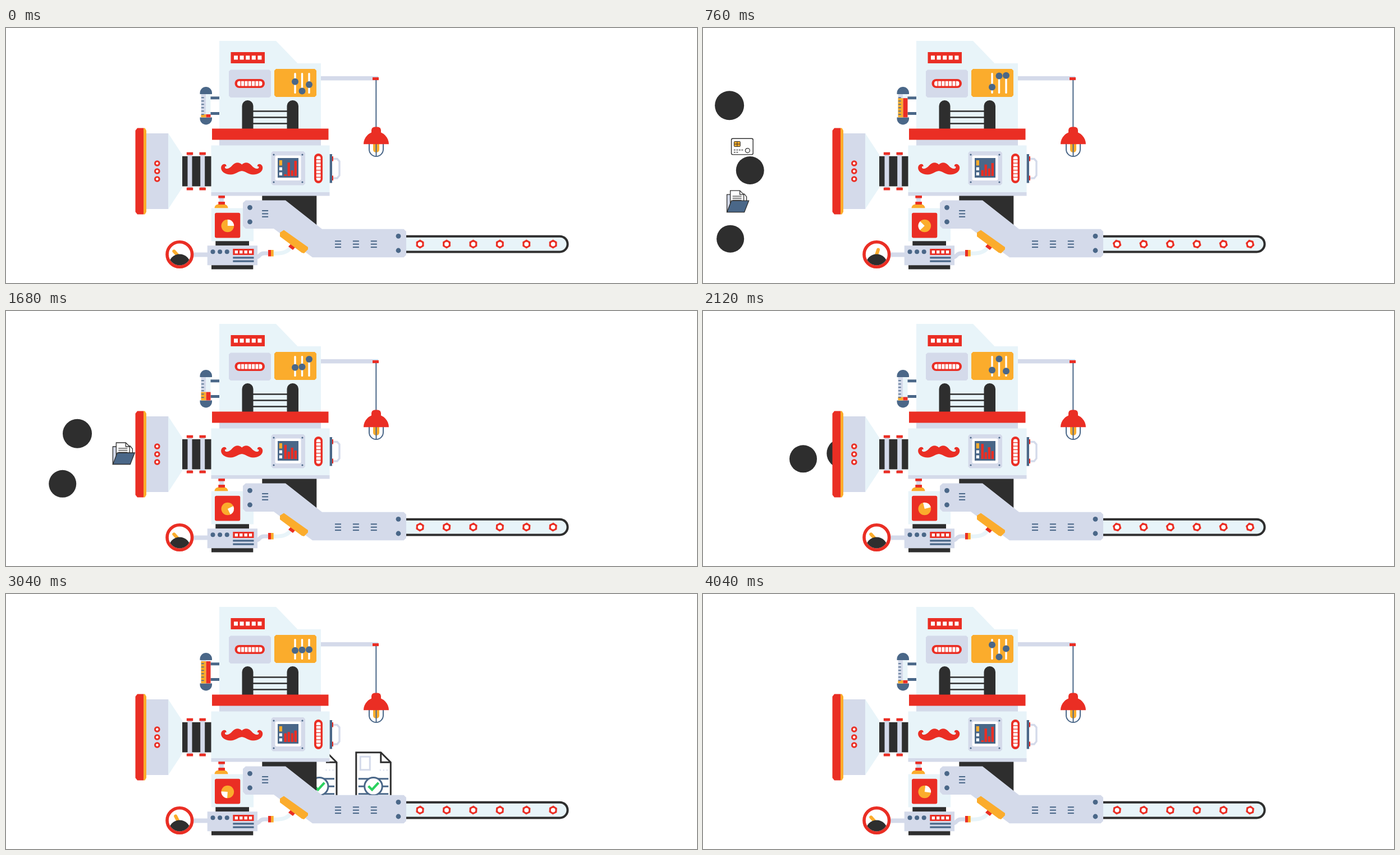
An HTML page with a canvas that plays this animation: 1231x455 px, repeating every 4080 ms.

```html
<!DOCTYPE html>
<html lang="en">
<head>
<meta charset="utf-8">
<title>Document machine</title>
<style>
html, body { margin: 0; width: 100%; height: 100%; overflow: hidden; background: #fff; }
canvas { display: block; width: 1231px; height: 455px; }
</style>
</head>
<body>
<canvas id="stage" width="1231" height="455"></canvas>
<script>
const g = document.getElementById('stage').getContext('2d');
const LOOP = 4080, STEP = 40, TAU = Math.PI * 2, DEG = Math.PI / 180;
const ICE = '#e8f4f9', LAV = '#d4daea', RED = '#ea2e24', YEL = '#fbac2c',
      DARK = '#2e2e2e', BLUE = '#4a6788', WHITE = '#fff', GREEN = '#2bd15f';

// --- helpers ---
const clamp = v => Math.max(0, Math.min(1, v));
const wave = (t, cycles, shift = 0) => Math.sin(TAU * cycles * t / LOOP + shift * DEG);
const hump = (t, start, end) => Math.sin(Math.PI * clamp((t - start) / (end - start)));

function box(c, x, y, x2, y2, r = 0) {
  g.fillStyle = c;
  g.beginPath();
  g.roundRect(x, y, x2 - x, y2 - y, r);
  g.fill();
}
function trace(pts, close) {
  g.beginPath();
  pts.forEach(([x, y]) => g.lineTo(x, y));
  if (close) g.closePath();
}
function poly(c, ...pts) {
  g.fillStyle = c;
  trace(pts, true);
  g.fill();
}
function line(c, w, ...pts) {
  g.strokeStyle = c;
  g.lineWidth = w;
  trace(pts);
  g.stroke();
}
function disc(c, x, y, r) {
  g.fillStyle = c;
  g.beginPath();
  g.arc(x, y, r, 0, TAU);
  g.fill();
}
function ring(c, w, x, y, r) {
  disc(WHITE, x, y, r);
  g.strokeStyle = c;
  g.lineWidth = w;
  g.stroke();
}
function chamfer(c, x, y, x2, y2, k) {
  poly(c, [x + k, y], [x2 - k, y], [x2, y + k], [x2, y2 - k],
    [x2 - k, y2], [x + k, y2], [x, y2 - k], [x, y + k]);
}

// --- icons drawn into the funnel ---
const badge = r => () => disc(DARK, 0, 0, r);
const icons = [
  { draw: badge(26), x: 43, y: 110, arrive: 2130 },
  { draw: card, x: 56, y: 189, arrive: 1522 },
  { draw: badge(25), x: 62, y: 254, arrive: 1340 },
  { draw: folder, x: 54, y: 329, arrive: 1786 },
  { draw: badge(24.5), x: 46, y: 400, arrive: 2375 }
];

function card() {
  box(DARK, -20, -15, 20, 15, 3);
  box(WHITE, -18.6, -13.6, 18.6, 13.6, 2);
  box(DARK, -15, -9.5, -3, 0.5, 2);
  box(YEL, -14, -8.5, -4, -0.5, 1);
  line(DARK, 1, [-14, -4.5], [-4, -4.5]);
  line(DARK, 1, [-9, -8.5], [-9, -0.5]);
  g.setLineDash([3, 1.5]);
  line(DARK, 1.3, [-15, 6], [2, 6]);
  line(DARK, 1.3, [-15, 10], [-6, 10]);
  g.setLineDash([]);
  ring(DARK, 1.2, 9.5, 7, 4);
}
function folder() {
  const edge = (c, ...pts) => {
    poly(c, ...pts);
    g.strokeStyle = DARK;
    g.lineWidth = 1.3;
    g.stroke();
  };
  edge(LAV, [-19, 19], [-19, -12], [-9, -12], [-6, -7], [12, -7], [12, 4]);
  edge(WHITE, [-8, 4], [-8, -13], [12, -13], [16, -8], [16, 4]);
  edge(WHITE, [-13, 4], [-13, -19], [4, -19], [11, -12], [11, 4]);
  line(DARK, 1.3, [4, -19], [4, -12], [11, -12]);
  for (const y of [-9, -5.5, -2]) line(DARK, 1.2, [-9, y], [7, y]);
  edge(BLUE, [-11, -1], [20, -1], [12, 19.5], [-19, 19.5]);
}
function drawIcons(t) {
  if (t < STEP) return;
  icons.forEach(({ draw, x, y, arrive }, i) => {
    const u = t / arrive;
    const px = x + (250 - x) * u ** 3.8;
    if (px > 270) return;
    const py = y + (254 - y) * clamp(u / 0.93) ** 1.7;
    const grow = 1 - (1 - clamp((t - i * 40) / 280)) ** 2;
    g.save();
    g.translate(px, py);
    g.scale(grow, grow);
    draw();
    g.restore();
  });
}

// --- finished sheets ---
function sheet(x, y) {
  g.save();
  g.translate(x, y);
  trace([[0.5, 0.5], [44.5, 0.5], [62, 18], [62, 86], [0.5, 86]], true);
  g.fillStyle = WHITE;
  g.fill();
  g.strokeStyle = DARK;
  g.lineWidth = 3;
  g.stroke();
  line(DARK, 3, [44.5, 0.5], [44.5, 18], [62, 18]);
  g.strokeStyle = LAV;
  g.lineWidth = 3;
  g.strokeRect(8, 8, 17, 23.5);
  for (let i = 0; i < 3; i++) box(LAV, 42.5 + i * 6, 31, 44.5 + i * 6, 33);
  for (let i = 0; i < 3; i++) line(BLUE, 3, [4.5, 47.5 + i * 13.5], [58, 47.5 + i * 13.5]);
  ring(BLUE, 3, 31.2, 61, 15.8);
  line(GREEN, 4.2, [22.3, 60.5], [28.8, 67], [40.3, 54.5]);
  g.restore();
}
// Five sheets hop along the belt one place at a time, then fade.
function drawSheets(t) {
  const HOP = 175, GAP = 96.3, START = 2714;
  if (t < START || t > 3900) return;
  const p = Math.min(5, (t - START) / HOP), n = Math.floor(p), u = p - n;
  const head = 432.5 + GAP * (n + 1 - (1 - u) ** 2) - GAP * (n === 5 ? 0 : 0);
  g.save();
  g.globalAlpha = 1 - clamp((t - 3720) / 180);
  g.beginPath();
  g.rect(545, 0, 686, 372);
  g.clip();
  for (let i = 0; i < 5; i++) sheet(head - i * GAP, 287 - 40 * u * (1 - u));
  g.restore();
}

// --- machine ---
function knob(i, y) {
  const x = 515 + i * 12.5;
  box(WHITE, x - 1.7, 80, x + 1.7, 117, 1.5);
  disc(BLUE, x, y, 6);
}
function tower(t) {
  poly(ICE, [380, 23], [481, 23], [519.5, 63], [561, 63], [561, 181], [380, 181]);
  box(RED, 400.5, 43, 461, 63);
  for (let i = 0; i < 5; i++) box(WHITE, 406 + i * 10.6, 49.3, 413 + i * 10.6, 56.5);
  chamfer(LAV, 397, 74.5, 472, 124, 3);
  box(RED, 407.5, 91, 461, 107, 8);
  box(WHITE, 412, 94.8, 456.5, 103.4, 4);
  for (let i = 1; i < 7; i++) line(RED, 1.3, [412 + i * 6.35, 94], [412 + i * 6.35, 104]);

  chamfer(YEL, 478, 73, 553, 123, 3);
  knob(0, 97 + 14 * wave(t, 6, -5));
  knob(1, 98.5 + 14 * wave(t, 3, 90));
  knob(2, 98.5 + 14 * wave(t, 4, 10));

  for (const y of [148.5, 159.5, 170.5]) line(DARK, 2.4, [440, y], [501, y]);
  box(DARK, 420.5, 129, 440.5, 181, [10, 10, 0, 0]);
  box(DARK, 500.5, 129, 521, 181, [10, 10, 0, 0]);
  box(LAV, 380, 199, 561, 210);
  box(RED, 367, 179.5, 574.5, 199.5);
}

function lamp() {
  box(LAV, 553, 86, 663, 93.5);
  box(RED, 653, 88, 664, 93);
  line(BLUE, 2, [659.3, 93], [659.3, 178]);
  box(YEL, 654, 206, 665, 222, [0, 0, 5, 5]);
  line(BLUE, 2, [659.5, 207], [659.5, 229]);
  g.beginPath();
  g.moveTo(647, 207);
  g.lineTo(647, 216.5);
  g.arc(659.5, 216.5, 12.5, Math.PI, 0, true);
  g.lineTo(672, 207);
  g.stroke();
  box(RED, 651, 176.5, 668, 192, 6);
  g.beginPath();
  g.arc(659.5, 207.3, 22.5, Math.PI, 0);
  g.fill();
}

function thermometer(t) {
  box(BLUE, 364, 122.3, 381, 127.3);
  box(BLUE, 364, 150, 381, 155);
  box(BLUE, 345.5, 105, 367, 118, [11, 11, 0, 0]);
  box(BLUE, 345.5, 159.5, 367, 172.5, [0, 0, 11, 11]);
  box(LAV, 347.5, 118, 356.5, 159.5);
  box(ICE, 356.5, 118, 364.5, 159.5);
  const y = 137 + 17 * wave(t, 2, 90);
  box(YEL, 347.5, y, 356.5, 159.5);
  box(RED, 356.5, y, 364.5, 159.5);
  for (let i = 0; i < 6; i++) line(BLUE, 1.6, [348, 124.3 + i * 6], [352.8, 124.3 + i * 6]);
}

function funnel() {
  poly(RED, [234, 178.5], [245, 178.5], [245, 332.5], [234, 332.5], [230.5, 328], [230.5, 183]);
  poly(YEL, [245, 178.5], [247.5, 178.5], [250, 183], [250, 328], [247.5, 332.5], [245, 332.5]);
  box(LAV, 250, 188, 289.3, 323);
  poly(ICE, [289, 188], [314, 226], [314, 285], [289, 323]);
  for (const y of [241.5, 255.5, 269.5]) ring(RED, 3, 269.3, y, 3.8);
  box(DARK, 314, 228.7, 366, 282.5);
  for (const x of [323.5, 346.2]) {
    box(LAV, x, 226, x + 8, 285);
    box(RED, x - 1.7, 221.7, x + 9.7, 226.5);
    box(RED, x - 1.7, 284.7, x + 9.7, 289.5);
  }
}

function moustache() {
  g.fillStyle = RED;
  for (const side of [1, -1]) {
    g.save();
    g.translate(420.2, 0);
    g.scale(side, 1);
    g.beginPath();
    g.moveTo(0.3, 244);
    g.bezierCurveTo(-5, 238.5, -12, 239.5, -17, 245);
    g.bezierCurveTo(-22, 251, -28, 252.5, -30, 249.5);
    g.bezierCurveTo(-31, 247.5, -29, 246, -27.5, 247);
    g.bezierCurveTo(-27, 241.5, -35, 241, -37, 248);
    g.bezierCurveTo(-38, 256, -30, 261.5, -20, 261.5);
    g.bezierCurveTo(-11, 261.5, -7, 255.5, 0.3, 255);
    g.fill();
    g.restore();
  }
}

function screen(t) {
  chamfer(LAV, 472.5, 220, 533, 280.5, 3);
  for (const x of [477, 528]) for (const y of [226, 275]) disc(BLUE, x, y, 1.6);
  box(WHITE, 479.5, 227.5, 525.5, 272, 3);
  box(BLUE, 484, 232, 521, 267);
  box(YEL, 486.8, 236, 492, 245.3);
  box(WHITE, 486.8, 248.5, 492, 254);
  box(WHITE, 486.8, 257.5, 492, 263);
  const swell = hump(t, 0, LOOP) ** 2;
  const bar = (i, top, rise) => box(RED, 495.5 + i * 6, top - rise * swell, 500 + i * 6, 264);
  bar(0, 261, 24);
  bar(1, 240, -12);
  bar(2, 254, 11);
  bar(3, 237, -13);
}

function core(t) {
  box(ICE, 365.5, 209.5, 576.5, 293);
  box(LAV, 365.5, 293, 576.5, 299.5);
  moustache();
  screen(t);
  box(RED, 549, 224, 564, 277, 7.5);
  box(WHITE, 552.8, 228.5, 560.5, 272.5, 3.8);
  for (let i = 1; i < 7; i++) line(RED, 1.3, [552, 228.5 + i * 6.3], [561, 228.5 + i * 6.3]);
  line(LAV, 3.4, [582, 233.5], [590, 233.5], [594, 238], [594, 263], [590, 268], [582, 268]);
  box(RED, 580, 229, 583, 237.5);
  box(RED, 580, 263.5, 583, 272);
  box(BLUE, 576.7, 225, 581, 276.5);
}

function nut(x, turn) {
  const pts = [];
  for (let i = 0; i < 6; i++) {
    const a = turn + i * TAU / 6;
    pts.push([x + 8 * Math.sin(a), 385.6 - 8 * Math.cos(a)]);
  }
  poly(RED, ...pts);
  disc(WHITE, x, 385.6, 3.9);
}
function belt(t) {
  box(DARK, 690, 369.7, 1002.5, 401.5, 15.9);
  box(ICE, 690, 373.7, 998.5, 397.5, 11.9);
  for (let i = 0; i < 6; i++) nut(737.6 + i * 47.4, -2 * TAU * t / LOOP);
}

function vents(x, y) {
  for (let i = 0; i < 3; i++) line(BLUE, 2.1, [x - 5.5, y + i * 5.4], [x + 5.5, y + i * 5.4]);
}
function arm() {
  poly(LAV, [427, 307.5], [498, 307.5], [563, 358.7], [708.5, 358.7], [713, 363], [713, 405],
    [708.5, 409.3], [546, 409.3], [477, 358], [427, 358], [422, 353], [422, 312]);
  for (const [x, y] of [[434.5, 320.3], [434.5, 345.8], [699, 371.3], [699, 397]]) disc(BLUE, x, y, 4.4);
  vents(461.6, 326);
  for (let i = 0; i < 3; i++) vents(591.5 + i * 31.9, 380.3);
}

function hose() {
  g.lineWidth = 7;
  g.strokeStyle = ICE;
  g.beginPath();
  g.moveTo(476, 402);
  g.bezierCurveTo(494, 403, 503, 399, 508, 390);
  g.stroke();
  g.strokeStyle = LAV;
  g.beginPath();
  g.moveTo(446, 409);
  g.bezierCurveTo(453, 409, 450, 402, 460, 402);
  g.lineTo(468, 402);
  g.stroke();
  box(RED, 467, 396, 472, 407.5);
  box(YEL, 472, 396, 476.7, 407.5);
  poly(RED, [507.5, 385], [515.5, 391], [511, 396], [503, 390]);
  poly(YEL, [495, 360.5], [538, 391], [538, 395], [531, 402], [527, 401], [488, 372], [488, 365]);
}

function pump(t) {
  box(LAV, 380, 303, 388, 311);
  box(RED, 378.3, 299, 390, 303.6);
  box(YEL, 371.5, 314.5, 395.5, 321.5, [7, 7, 0, 0]);
  box(RED, 378.3, 310, 390, 315);
  box(ICE, 365.7, 321.5, 441, 380.5);
  box(RED, 372, 329.7, 417.3, 374.5, 3);
  disc(YEL, 394.8, 353, 11.3);
  const a = -Math.PI / 2 - 2 * TAU * t / LOOP;
  g.fillStyle = WHITE;
  g.beginPath();
  g.moveTo(394.8, 353);
  g.arc(394.8, 353, 11.3, a, a + Math.PI / 2);
  g.fill();
  box(DARK, 373.3, 380.3, 433, 388.5);
}

function control() {
  box(LAV, 333, 400.5, 360, 408.5);
  box(LAV, 358.7, 388.3, 448, 423.2);
  box(DARK, 366, 423.2, 440.3, 430.5);
  for (let i = 0; i < 3; i++) disc(BLUE, 368.5 + i * 12.6, 399.2, 4);
  box(RED, 404.3, 394, 441.5, 405);
  for (let i = 0; i < 4; i++) box(WHITE, 407.7 + i * 8.4, 397, 413 + i * 8.4, 402.3);
  box(BLUE, 404.3, 408.3, 441.5, 411.5);
  box(BLUE, 404.3, 414.5, 441.5, 417.7);
}

function gauge(t) {
  const a = (-42 + 66 * hump(t, 0, 1200) + 16 * hump(t, 2800, 3200)) * DEG;
  ring(RED, 5.6, 309.3, 404, 22.3);
  g.save();
  g.beginPath();
  g.arc(309.3, 404, 19.5, 0, TAU);
  g.clip();
  g.lineCap = 'round';
  line(YEL, 6, [308, 408], [308 + 13 * Math.sin(a), 408 - 13 * Math.cos(a)]);
  disc(DARK, 309.3, 423, 19.5);
  g.restore();
}

function frame() {
  const t = Math.floor(performance.now() % LOOP / STEP) * STEP;
  g.fillStyle = WHITE;
  g.fillRect(0, 0, 1231, 455);
  drawIcons(t);
  drawSheets(t);
  lamp();
  thermometer(t);
  tower(t);
  funnel();
  box(DARK, 456.3, 299, 553.3, 353);
  core(t);
  belt(t);
  pump(t);
  arm();
  hose();
  control();
  gauge(t);
  requestAnimationFrame(frame);
}
frame();
</script>
</body>
</html>
```
